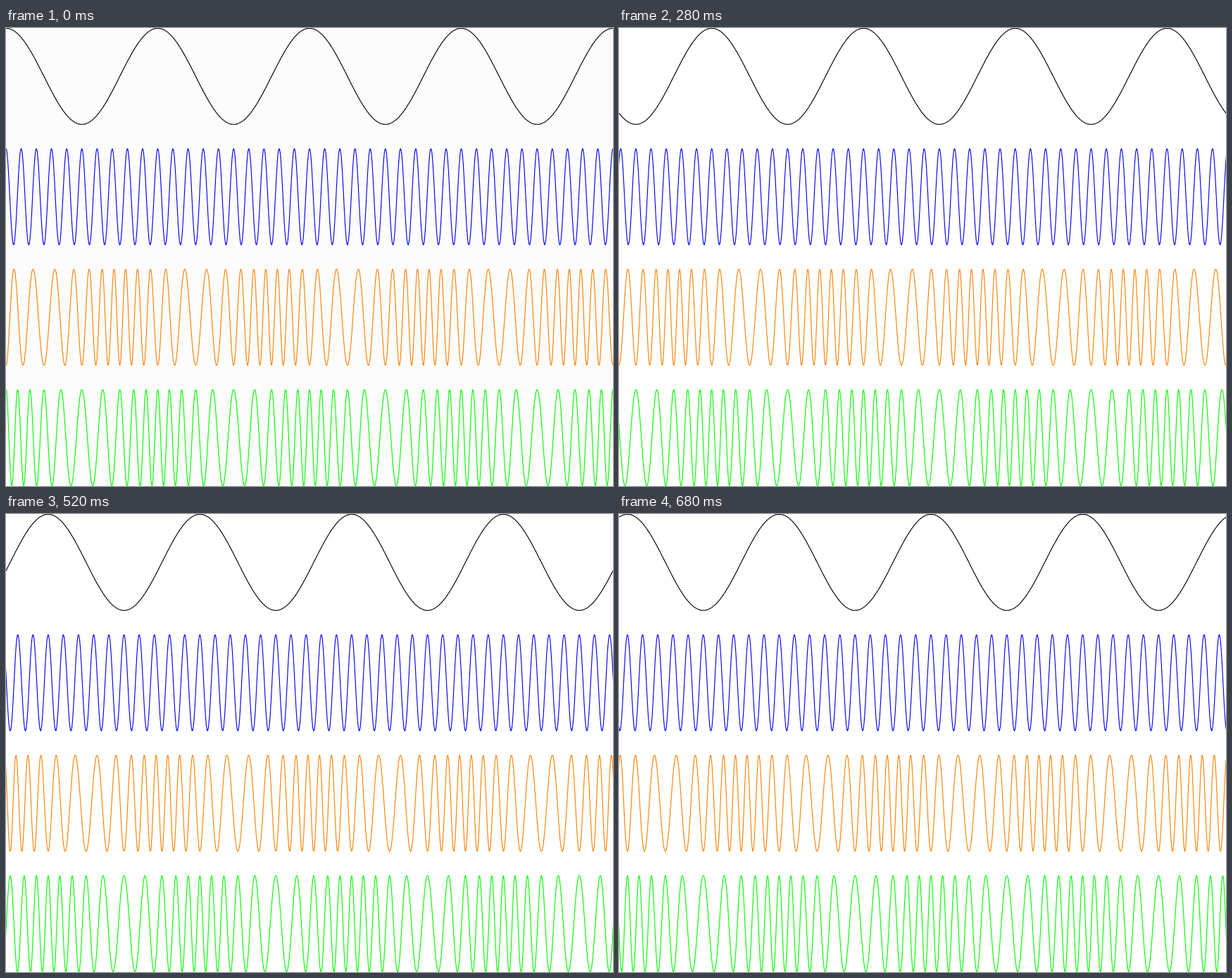
Animation of 862 by 650 pixels, one loop 720 ms. Source, as an HTML page:

```html
<!DOCTYPE html>
<html lang="en">
<head>
<meta charset="utf-8">
<title>Phase and frequency modulation</title>
<style>
  html, body { margin: 0; width: 862px; height: 650px; overflow: hidden; background: #fff; }
  svg { display: block; }
  path { fill: none; stroke-width: 1.15; stroke-linejoin: round; }
</style>
</head>
<body>
<svg width="862" height="650" viewBox="0 0 862 650">
  <rect id="back" width="862" height="650" fill="#fff"/>
  <g id="waves"></g>
</svg>
<script>
const WIDTH = 862, PERIOD = WIDTH / 4;
const LOOP = 720, STEP = 40, STEPS = LOOP / STEP;
const MID = 68.6, PITCH = 170.95, AMP = 68.2;
const RATIO = 10, DEPTH = Math.PI;

// Phase of each wave as a function of the signal angle
const rows = [
  ['#000000', a => a],
  ['#0000ff', a => RATIO * a],
  ['#ff8000', a => RATIO * a + DEPTH * Math.cos(a)],
  ['#00ff00', a => RATIO * a + DEPTH * Math.sin(a)]
];

const back = document.getElementById('back');
const waves = document.getElementById('waves');

function wavePath(phase, mid) {
  const pts = [];
  for (let x = -4; x <= WIDTH + PERIOD + 4; x += 0.5) {
    const y = mid - AMP * Math.cos(phase(2 * Math.PI * x / PERIOD));
    pts.push(x + ' ' + y.toFixed(2));
  }
  return 'M' + pts.join('L');
}

rows.forEach(([color, phase], i) => {
  const path = document.createElementNS('http://www.w3.org/2000/svg', 'path');
  path.setAttribute('d', wavePath(phase, MID + i * PITCH));
  path.setAttribute('stroke', color);
  waves.appendChild(path);
});

function draw(ms) {
  const step = Math.floor((ms % LOOP) / STEP);
  waves.setAttribute('transform', `translate(${-step * PERIOD / STEPS} 0)`);
  back.setAttribute('fill', step === 0 ? '#fcfcfc' : '#fff');
}

const start = performance.now();
function tick() {
  draw(performance.now() - start);
  requestAnimationFrame(tick);
}
tick();
</script>
</body>
</html>
```
